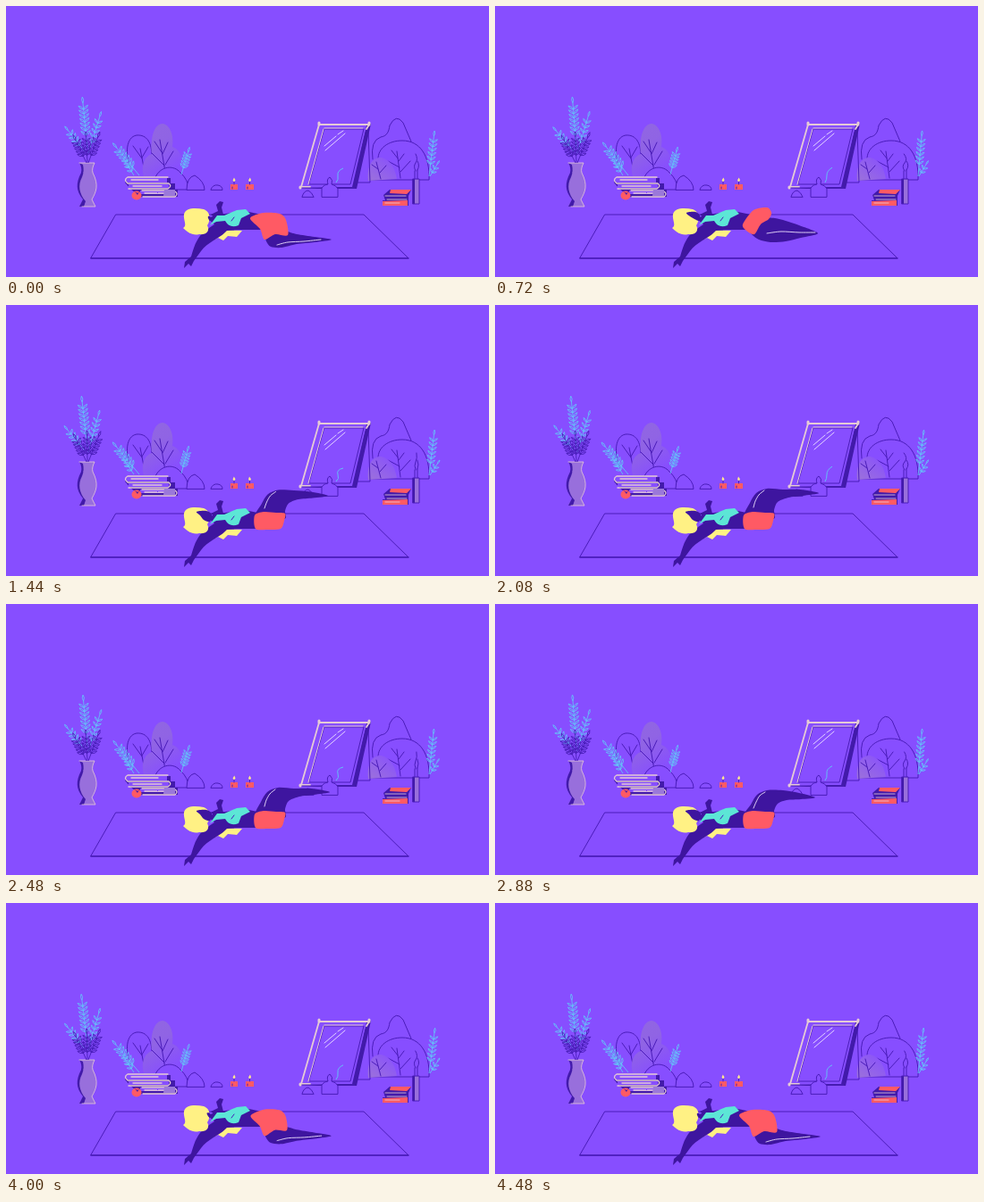
An HTML page for the animation above (4520 ms loop, 540 by 304 pixels).

```html
<!DOCTYPE html>
<html lang="en">
<head>
<meta charset="utf-8">
<title>Floor twist</title>
<style>
html, body { margin: 0; width: 100%; height: 100%; overflow: hidden; background: #874eff; }
svg { display: block; width: 100vw; height: 100vh; }
.ink { fill: none; stroke: #4a1cb9; stroke-width: 1; }
.cream { fill: none; stroke: #e6cbd5; stroke-width: 1.3; }
.dark { fill: #421aaa; }
.red { fill: #ff5a64; }
.vase { fill: #986fdc; }
.skin { fill: #3e159f; }
.hair { fill: #fff184; }
.top { fill: #5ce6d6; }
.ink, .cream, .shine { stroke-linecap: round; stroke-linejoin: round; }
.shine { fill: none; stroke: #efe2ff; stroke-width: .9; }
</style>
</head>
<body>
<svg id="stage" viewBox="0 0 540 304" preserveAspectRatio="none">
  <defs>
    <linearGradient id="bush" x1="0" y1="0" x2=".5" y2="1">
      <stop offset="0" stop-color="#9166e2"/>
      <stop offset=".45" stop-color="#9064e4"/>
      <stop offset="1" stop-color="#874eff"/>
    </linearGradient>
    <linearGradient id="shrub" x1="1" y1="0" x2="0" y2="1">
      <stop offset="0" stop-color="#874eff"/>
      <stop offset="1" stop-color="#9c72da"/>
    </linearGradient>
    <filter id="rough" x="0" y="0" width="540" height="304" filterUnits="userSpaceOnUse" color-interpolation-filters="sRGB">
      <feTurbulence type="fractalNoise" baseFrequency=".35" numOctaves="1" seed="4"/>
      <feDisplacementMap in="SourceGraphic" scale="1.5" xChannelSelector="R" yChannelSelector="G"/>
    </filter>
  </defs>
  <rect width="540" height="304" fill="#874eff"/>

  <g filter="url(#rough)">
    <path class="ink" stroke-width="1.2" d="M123 234H400L450 283H95Z"/>
    <path class="ink" style="stroke-width:1.5" d="M95 283H450"/>

    <!-- left garden -->
    <path class="ink" d="M139 181C133 166 134 147 146 145C158 144 163 154 163 168M155 186L150 160M152 171L142 157M152 170L159 158"/>
    <path fill="url(#bush)" d="M154 191C150 176 157 168 163 166C161 147 166 132 175 132C184 133 188 147 186 158C199 162 200 184 193 194Z"/>
    <path class="ink" d="M178 186L172 150M174 164L166 152M177 179L163 165M175 166L181 153M178 178L187 163"/>
    <path class="ink" fill="#874eff" style="fill:#874eff" d="M167 192C173 179 188 178 195 187Q204 195 204 206H188"/>
    <path class="ink" style="fill:#874eff" d="M202 206Q202 192 211 190Q222 197 222 206ZM229 206Q231 200 237 201Q242 202 242 206Z"/>

    <!-- towels -->
    <path class="dark" d="M137 193H184V199H189V206H192V214H150L139 205L133 198Z"/>
    <path fill="#874eff" d="M135 193H180V198H135ZM137 200H182V204H137ZM150 207H180V211H150Z"/>
    <path class="cream" d="M181 192H136Q131 195 136 199H182Q186 202 181 205H137M140 195H170M142 202H174M152 207H187Q194 210 189 214H153M155 210H178"/>
    <path fill="#9b78da" d="M177 206H189V213H176Z"/>
    <ellipse class="red" cx="146" cy="212.500" rx="5.500" ry="5"/>
    <path class="dark" d="M144 208L147 210L149 208L147 212Z"/>

    <!-- candles -->
    <path class="red" d="M251 200H259V206H251ZM268 200H277V206H268Z"/>
    <path class="ink" d="M255 200V197M272.500 200V197M253 203V205M270 203V205"/>

    <!-- vase -->
    <path class="vase" d="M82 176H99C97 180 96 183 97 187C104 201 101 208 96 217L100 225H82L86 217C79 207 78 201 85 187C86 183 85 180 82 176Z"/>
    <path class="dark" d="M82 176L86 178C87 183 87 187 85 192C80 201 82 211 89 219L87 225H82L86 217C78 207 78 199 84 187C85 183 84 179 82 176Z"/>
    <path class="cream" style="stroke-width:.8" d="M82 176H99C97 180 96 184 97 187C104 201 101 208 96 217L100 225H85"/>

    <!-- right garden -->
    <path class="ink" d="M410 172Q407 151 419 147C426 146 428 141 429 134Q436 120 444 131L453 152M408 195H473C474 168 463 151 443 151C427 151 416 160 416 171M441 193L437 163M438 171L431 162M440 181L427 174M439 174L445 166M441 186L452 174"/>
    <path fill="url(#shrub)" d="M405 196C403 179 410 169 420 170C431 173 435 183 437 194Z"/>
    <path class="ink" d="M419 194L414 175M416 183L409 178M418 187L425 179"/>

    <!-- mirror -->
    <path class="ink" d="M405 139L407 198H390"/>
    <path class="dark" d="M349 132H408L405 146L392 205H330L386 202L402 138Z"/>
    <path fill="#874eff" d="M351 134H403L387 203H330Z"/>
    <path class="cream" style="stroke-width:1.8" d="M350 133H406L403 138M350 133L330 203H340"/>
    <path class="ink" d="M356 138H400L385 200H339ZM330 204H390"/>
    <path class="cream" style="stroke-width:1" d="M355 138L338 200M356 137H399"/>
    <path class="cream" style="stroke-width:3" d="M350 131V133M406 131V133M329 203V204"/>
    <path class="shine" d="M356 157L369 146M371 144L377 140M357 162L379 143"/>
    <path class="ink" style="fill:#874eff" d="M331 214Q333 207 338 207Q342 209 344 214ZM353 214V204Q356 200 360 200Q358 194 362 192Q366 195 364 200Q369 201 371 205V214Z"/>

    <!-- books and incense -->
    <path class="dark" d="M422 212L429 206H453L450 213V224H422L421 218H424Z"/>
    <path class="red" d="M430 206H453L448 211L429 210ZM421 219L449 218V224H421Z"/>
    <path class="cream" style="stroke-width:.8" d="M424 213H447M426 217H448M424 221H440"/>
    <path class="vase" d="M455 194H462V222H455Z"/>
    <path class="dark" d="M455 194H457V222H455Z"/>
    <path class="ink" d="M457 194V185M460 194V184M455 194H462V222H455Z"/>

    <g id="plants"></g>
    <path id="smoke" class="ink"/>
    <path id="steam" fill="none" stroke="#65bff6"/>
    <g id="flames" fill="#ffe890"></g>
  </g>

  <!-- figure -->
  <g>
    <path class="skin" d="M229 234L237 230L235 223L239 219L243 220L241 226L243 234L235 239Z"/>
    <path class="hair" d="M222 247Q230 252 242 251L264 252L258 259L248 258L243 263L237 260L231 263L225 257Z"/>
    <path class="skin" d="M225 238L238 234L267 230L286 234L287 251H263L247 252C239 261 226 264 218 275L210 286L207 292L204 289L199 294L200 287L207 281C210 271 213 259 224 251L233 245Z"/>
    <path class="top" d="M228 246L236 235L244 235L258 229L268 228L273 233L263 238L260 246Q250 250 245 241L235 242Z"/>
    <path class="ink" d="M252 241L255 237"/>
    <path class="hair" d="M199 234C200 226 212 226 221 228C229 231 229 240 225 246C228 252 225 257 216 256C209 258 203 254 198 249C203 246 198 240 199 234Z"/>
    <path id="face" class="skin"/>
    <path id="legs" class="skin"/>
    <path id="shorts" class="red"/>
    <path id="shine" class="shine"/>
  </g>
</svg>

<script>
const LOOP = 4520, STEP = 40;
const $ = id => document.getElementById(id);
const mix = (a, b, k) => a + (b - a) * k;
const points = text => text.split(' ').map(p => p.split(',').map(Number));

// Each row is one pose: resting, lifting, almost up, up.
const poses = {
  legs: [
    '290,257 293,254 300,252 314,253 325,256 345,259 364,262 345,265 325,267 308,271 296,270 291,264',
    '284,250 290,243 300,238 313,238 325,241 340,246 361,255 342,260 325,264 308,265 295,262 287,256',
    '280,237 286,225 293,214 304,209 322,209 340,212 358,217 342,219 326,220 316,224 312,232 311,240',
    '280,237 285,222 292,211 304,206 322,207 342,207 362,211 344,214 328,216 316,221 312,230 311,240'
  ],
  shorts: [
    '273,238 288,232 306,233 313,240 315,257 301,256 289,262 284,250',
    '277,245 289,229 304,226 309,232 306,239 297,245 290,256 281,252',
    '278,236 288,232 302,233 312,234 311,242 307,251 292,252 279,251',
    '278,236 288,232 302,233 312,234 311,242 307,251 292,252 279,251'
  ],
  shine: [
    '303,268 315,265 333,264 352,262',
    '304,255 320,253 340,254 358,254',
    '289,229 292,222 296,215 302,211',
    '289,227 291,220 295,213 301,208'
  ],
  face: [
    '226,236 228,236 229,239 228,241 227,240 226,238',
    '214,232 224,231 229,235 228,241 223,239 218,236',
    '213,232 224,231 230,235 228,243 221,241 217,236',
    '213,232 224,231 230,235 228,243 221,241 217,236'
  ]
};
for (const part in poses) poses[part] = poses[part].map(points);

function curve(list, closed) {
  const n = list.length;
  const at = i => closed ? list[(i + n) % n] : list[Math.max(0, Math.min(n - 1, i))];
  let d = 'M' + list[0];
  for (let i = 0; i < (closed ? n : n - 1); i++) {
    const [a, b, c, e] = [at(i - 1), at(i), at(i + 1), at(i + 2)];
    const handle = (p, from, to, s) => p.map((v, j) => (v + s * (to[j] - from[j]) / 7).toFixed(2));
    d += `C${handle(b, a, c, 1)} ${handle(c, b, e, -1)} ${c}`;
  }
  return d + (closed ? 'Z' : '');
}

function lift(t) {
  const m = t < 2120 ? t : 4240 - t;
  if (m <= 0) return 0;
  if (m < 720) return (m / 720) ** 2;
  if (m < 1360) return 1 + (m - 720) / 640;
  if (m < 1640) return 3 - (1 - (m - 1360) / 280) ** 2;
  return 3;
}

function drawPart(part, q) {
  const i = Math.min(2, Math.floor(q)), next = poses[part][i + 1];
  const shape = poses[part][i].map((p, j) => p.map((v, k) => mix(v, next[j][k], q - i)));
  $(part).setAttribute('d', curve(shape, part !== 'shine'));
}

// Leafy stems: base, tip, pairs of leaves, leaf length.
const BLUE = '#65c4f8', INK = '#451ab4';
const sprigs = [
  [91, 160, 86, 109, 7, 7, BLUE], [92, 165, 104, 124, 5, 6, BLUE], [88, 163, 69, 140, 4, 6, BLUE],
  [90, 176, 78, 151, 5, 7, INK], [91, 176, 90, 147, 5, 6, INK], [92, 176, 103, 148, 5, 7, INK],
  [149, 190, 124, 159, 6, 7, BLUE], [143, 190, 134, 176, 2, 5, BLUE],
  [196, 189, 203, 164, 5, 6, BLUE],
  [473, 191, 478, 146, 6, 6, BLUE], [474, 191, 482, 178, 2, 5, BLUE]
];

function sprig([x0, y0, x1, y1, count, size, color]) {
  const angle = Math.atan2(y1 - y0, x1 - x0);
  let d = `M${x0} ${y0}L${x1} ${y1}`;
  const leaf = (x, y, a) => {
    const spot = (r, turn) => `${x + r * Math.cos(a + turn)} ${y + r * Math.sin(a + turn)}`;
    d += `M${x} ${y}Q${spot(size * .65, .5)} ${spot(size, 0)}Q${spot(size * .65, -.5)} ${x} ${y}`;
  };
  for (let i = 0; i < count; i++) {
    const k = .3 + .65 * i / count;
    for (const side of [-.85, .85]) leaf(mix(x0, x1, k), mix(y0, y1, k), angle + side);
  }
  leaf(x1, y1, angle);
  return `<path d="${d}" fill="none" stroke="${color}" stroke-width=".85"/>`;
}
$('plants').innerHTML = sprigs.map(sprig).join('');
const stems = [...$('plants').children];

function draw(t) {
  const q = lift(t), turn = t / LOOP * 2 * Math.PI;
  Object.keys(poses).forEach(part => drawPart(part, q));
  stems.forEach((stem, i) => {
    const [x, y] = sprigs[i];
    stem.setAttribute('transform', `rotate(${1.2 * Math.sin(turn * 2 + i)} ${x} ${y})`);
  });
  const w = Math.sin(turn * 4);
  $('smoke').setAttribute('d', `M458 185Q${455 + w} 180 458 176T${458 + w} 166M460 184Q${463 - w} 179 460 174`);
  $('steam').setAttribute('d', `M369 198Q${372 + w} 195 371 190T377 ${182 + w}`);
  $('flames').innerHTML = [255, 272.5].map((x, i) => {
    const sway = .5 * Math.sin(turn * 8 + i);
    return `<path d="M${x - 1.3} 196Q${x - 1.5} 195 ${x + sway} 192.500Q${x + 1.7} 195 ${x + 1.3} 196Q${x} 198 ${x - 1.3} 196Z"/>`;
  }).join('');
}

const start = performance.now();
function tick() {
  const t = (performance.now() - start) % LOOP;
  draw(Math.floor(t / STEP) * STEP);
  requestAnimationFrame(tick);
}
tick();
</script>
</body>
</html>
```
